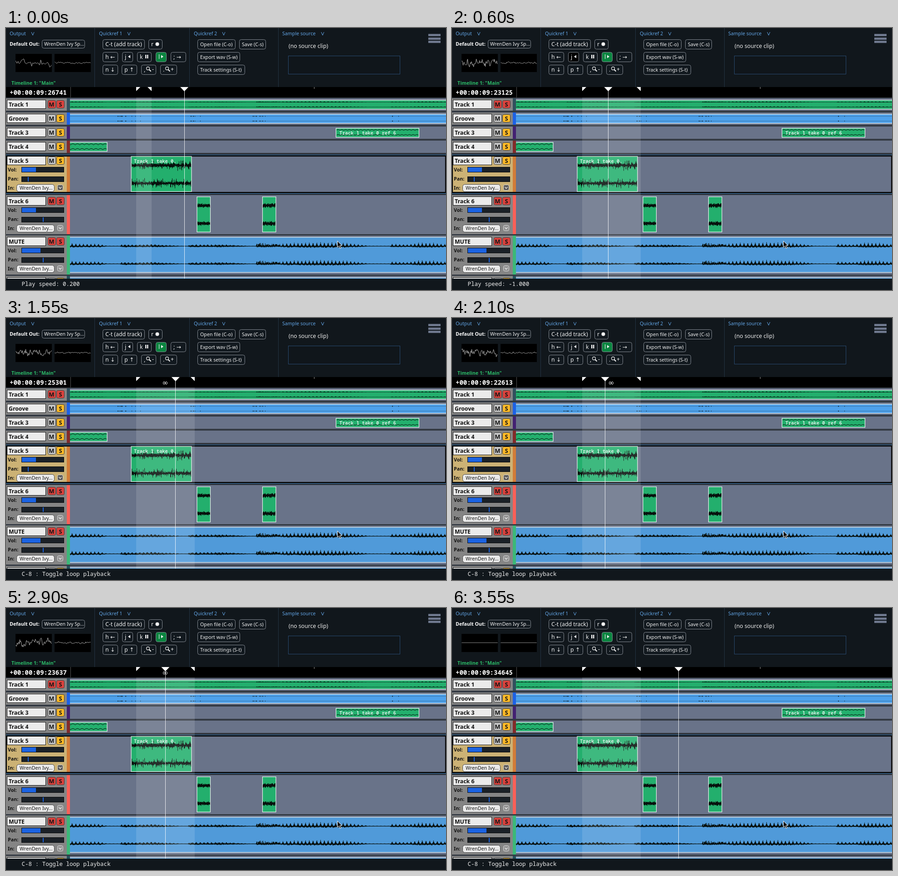
Recreate the animation shown at these times as an HTML page with a canvas. Size 970 px wide and 577 px high, loop 3.6 s.

```html
<!DOCTYPE html>
<html lang="en">
<head>
<meta charset="utf-8">
<title>Timeline playback</title>
<style>
html, body { margin: 0; width: 100%; height: 100%; overflow: hidden; background: #11171c; }
canvas { display: block; }
</style>
</head>
<body>
<canvas id="stage" width="970" height="577"></canvas>
<script>
const W = 970, H = 577, LOOP = 3600, STEP = 50;
const SANS = '"Noto Sans", "Open Sans", "DejaVu Sans", sans-serif';
const MONO = '"Noto Sans Mono", "DejaVu Sans Mono", monospace';
const GREEN = '#23af6d', PANEL = '#11171c', LANE = '#697389';
const screen = document.getElementById('stage').getContext('2d');
const backdrop = document.createElement('canvas');
backdrop.width = W;
backdrop.height = H;
let g = backdrop.getContext('2d');

const rnd = n => { const v = Math.sin(n * 12.9898) * 43758.5453; return v - Math.floor(v); };

function lerpKeys(keys, x) {
  const i = keys.findIndex(k => k[0] > x);
  if (i < 0) return keys[keys.length - 1][1];
  if (i === 0) return keys[0][1];
  const [a, va] = keys[i - 1], [b, vb] = keys[i];
  return va + (vb - va) * (x - a) / (b - a);
}

// ---- drawing helpers ----
function rect(x, y, w, h, color) {
  g.fillStyle = color;
  g.fillRect(x, y, w, h);
}

function frame(x, y, w, h, color) {
  g.strokeStyle = color;
  g.lineWidth = 1;
  g.strokeRect(x + .5, y + .5, w - 1, h - 1);
}

function text(str, x, y, size, color, { weight = 400, family = SANS, align = 'left' } = {}) {
  g.font = `${weight} ${size}px ${family}`;
  g.textAlign = align;
  g.fillStyle = color;
  g.fillText(str, x, y);
}

function poly(points, fill) {
  g.beginPath();
  points.forEach(([x, y]) => g.lineTo(x, y));
  g.closePath();
  g.fillStyle = fill;
  g.fill();
}

function polyline(points, color, width = 1) {
  g.beginPath();
  points.forEach(([x, y]) => g.lineTo(x, y));
  g.strokeStyle = color;
  g.lineWidth = width;
  g.stroke();
}

function pill(x, y, w, h, fill, stroke, radius = 4) {
  g.beginPath();
  g.roundRect(x + .5, y + .5, w - 1, h - 1, radius);
  g.fillStyle = fill;
  g.fill();
  g.strokeStyle = stroke;
  g.lineWidth = 1;
  g.stroke();
}

function button(label, x, y, w, size = 10.7, fill = '#12191f') {
  pill(x, y, w, 22, fill, '#848a92');
  text(label, x + 6, y + 15, size, '#f2f2f2');
}

function magnifier(x, y) {
  g.beginPath();
  g.arc(x, y, 3.4, 0, 7);
  g.strokeStyle = '#f2f2f2';
  g.lineWidth = 1.2;
  g.stroke();
  polyline([[x + 2.5, y + 2.5], [x + 6.5, y + 6.5]], '#f2f2f2', 2.2);
}

// ---- waveforms ----
function wave(x0, x1, centers, up, down) {
  g.fillStyle = '#07100d';
  centers.forEach((cy, ch) => {
    for (let x = x0; x < x1; x++) {
      const u = up(x, ch), d = down(x, ch);
      g.fillRect(x, cy - u, 1, u + d);
    }
  });
}

// A one pixel line that ripples upwards from its centre.
function ripple(x0, x1, centers, height, rate) {
  const up = x => height * Math.abs(Math.sin(x * rate));
  wave(x0, x1, centers, x => up(x) + .6, x => .4 - up(x));
}

const loudness = [[141, 7], [165, 5], [205, 5], [222, .5], [250, .3], [257, 6], [285, 4.5],
  [325, 5], [350, 3.5], [385, .4], [400, .3], [406, 5], [440, 4], [470, 5], [500, 3.5], [535, .4],
  [550, .4], [553, 7], [600, 4], [620, 7], [700, 8.5], [755, 7], [800, .5], [845, .3],
  [850, 5], [885, 3.5], [910, 8], [945, 7], [970, 4]];
const tooth = x => {
  const peak = Math.pow(1 - Math.abs(2 * (x % 8.3) / 8.3 - 1), 2.4);
  if (x > 553 && x < 605) return rnd(x);
  return x > 250 && x < 550 ? .5 * peak + .5 * rnd(x) * rnd(x + 9) : peak;
};
const swell = x => lerpKeys(loudness, x) * tooth(x);
const dip = x => lerpKeys(loudness, x) * (.12 + .32 * rnd(x + .5) * (1 - tooth(x)));

// c is the vertical centre of the lane's name box.
function clip(x, c, w, h, color) {
  const y = c - 9.2;
  rect(x, y, w, h, color);
  g.strokeStyle = '#f0f4f2';
  g.lineWidth = 1.2;
  g.strokeRect(x, y, w, h);
}

function clipName(name, x, y) {
  text(name, x, y, 10.4, 'rgba(235,245,240,.85)', { weight: 600, family: MONO });
}

// ---- static panels ----
function drawTopPanel() {
  rect(0, 0, W, 130, PANEL);
  [196, 405, 601].forEach(x => rect(x - 1, 0, 1, 130, '#233443'));
  [['Output', 8, 59], ['Quickref 1', 205, 271], ['Quickref 2', 414, 480], ['Sample source', 609, 698]]
    .forEach(([label, x, arrow]) => {
      text(label, x, 16, 10.7, '#62a5e6');
      polyline([[arrow - 3, 9], [arrow, 16], [arrow + 3, 9]], '#62a5e6');
    });
  text('Default Out:', 8, 39, 10.7, '#fff', { weight: 700 });
  pill(79, 26, 95, 19, '#12191f', '#848a92');
  text('WrenDen Ivy Sp...', 84, 39, 10.7, '#f2f2f2');
  text('Timeline 1: "Main"', 12, 125, 10.7, '#2cbb68', { weight: 700 });

  button('C-t (add track)', 213, 25, 93, 12.3);
  button('r', 314, 25, 31, 12.3);
  g.beginPath();
  g.arc(333.5, 35.5, 4, 0, 7);
  g.fill();
  button('h ←', 213, 53, 34, 12.3);
  button('; →', 363, 53, 34, 12.3);
  button('n ↓', 213, 81, 34, 12.3);
  button('p ↑', 255, 81, 34, 12.3);
  button(',', 298, 81, 33, 12.3);
  button('.', 340, 81, 37, 12.3);
  magnifier(313, 89);
  magnifier(355, 89);
  text('-', 322, 95, 12.3, '#f2f2f2');
  text('+', 363, 95, 12.3, '#f2f2f2');

  button('Open file (C-o)', 422, 25, 84);
  button('Save (C-s)', 514, 25, 59);
  button('Export wav (S-w)', 422, 53, 94);
  button('Track settings (S-t)', 422, 81, 105);

  text('(no source clip)', 623, 44, 12.3, '#ececec');
  rect(622, 61, 247, 41, '#10161b');
  frame(622, 61, 247, 41, '#28496f');
  [13, 21, 28].forEach(y => rect(931, y, 27, 5, '#6d778c'));
}

function drawLane(name, c, small, strip, { muted, bg = '#858585', vol, pan }) {
  const y = c - 13, h = small ? 27 : 86;
  rect(0, y, 134, h, bg);
  rect(134, y, 7, h, strip);
  rect(141, y, W - 141, h, LANE);
  rect(2, c - 10, 86, 20, '#151515');
  rect(3, c - 9, 84, 18, '#ebebeb');
  text(name, 6, c + 4.5, 12.3, '#101010', { weight: 700 });
  pill(92, c - 9, 18, 18, muted ? '#da423d' : '#c5c5c5', '#3c3c3c', 3);
  pill(111, c - 9, 18, 18, muted ? '#da423d' : '#fdb927', '#3c3c3c', 3);
  text('M', 100.5, c + 5, 13, '#151515', { weight: 600, align: 'center' });
  text('S', 120, c + 5, 13, '#151515', { weight: 600, align: 'center' });
  if (small) return;

  text('Vol:', 4, c + 24, 10.7, '#101010', { weight: 700 });
  text('Pan:', 4, c + 44, 10.7, '#101010', { weight: 700 });
  text('In:', 4, c + 64, 10.7, '#101010', { weight: 700 });
  [14, 35].forEach(dy => {
    rect(34, c + dy, 94, 12, '#1b2127');
    frame(34, c + dy, 94, 12, '#08090a');
  });
  rect(35, c + 15, vol - 35, 10, '#1b63e2');
  rect(pan - 1, c + 36, 2, 10, '#1b63e2');
  pill(23, c + 52, 84, 17, '#ebebeb', '#444', 5);
  text('WrenDen Ivy...', 30, c + 64, 10.7, '#151515');
  pill(113, c + 53, 13, 13, bg === '#858585' ? '#929292' : '#5c5a58', '#ddd', 3);
  polyline([[116.5, c + 58], [119.5, c + 61.5], [122.5, c + 58]], '#f2f2f2', 1.2);
}

function drawTracks() {
  rect(0, 152, W, 400, '#343a43');
  drawLane('Track 1', 168, true, '#31505e', { muted: true });
  drawLane('Groove', 199, true, '#1d62e6', {});
  drawLane('Track 3', 230, true, '#432172', {});
  drawLane('Track 4', 261, true, '#832a2a', {});
  drawLane('Track 5', 292, false, '#d27c38', { bg: '#ccb275', vol: 66, pan: 49 });
  drawLane('Track 6', 381, false, '#fa6058', { muted: true, vol: 66, pan: 82 });
  drawLane('MUTE', 470, false, '#3cb878', { muted: true, vol: 76, pan: 82 });
  drawLane('', 559, false, '#24505c', { vol: 66, pan: 82 });

  // selected lane outline
  [279, 364].forEach(y => {
    rect(0, y - 1, W, 3, '#14191f');
    rect(0, y, W, 1, '#4b8cc4');
  });
  g.lineWidth = 2;
  g.strokeStyle = '#050505';
  g.strokeRect(1, 282, 968, 80);

  g.save();
  g.beginPath();
  g.rect(141, 152, W - 141, 400);
  g.clip();

  clip(130, 168, 860, 20, GREEN);
  wave(141, W, [163.5, 174], x => .3 + swell(x) * .18, x => .2 + dip(x) * .15);
  clip(130, 199, 860, 20, '#4da1ec');
  const beat = x => [[245, 300], [402, 432], [541, 578], [850, 868]].some(([a, b]) =>
    x >= a && x < b && rnd(x) > .6 + .35 * (x - a) / (b - a)) ? .8 : .15;
  wave(141, W, [194.5, 205], beat, beat);

  clip(727.5, 230, 183, 20, GREEN);
  ripple(729, 909, [225.5, 236.5], 1.6, .38);
  clipName('Track 1 take 0 ref 6', 735, 235);

  clip(120, 261, 103, 20, GREEN);
  ripple(141, 222, [257.5, 268], 2.4, .31);

  clip(276, 292, 133, 77.5, GREEN);
  const rough = k => (x, ch) => 1 + 3.2 * rnd(x + ch * 531 + k) + 8 * Math.pow(rnd(x * 3 + ch * 77 + k), 6);
  wave(277, 408, [302.5, 342], rough(0), rough(9));
  clipName('Track 1 take 0.', 282, 297);

  [421, 565.5].forEach(left => {
    const x0 = Math.floor(left);
    clip(left, 381, 29.5, 77.5, GREEN);
    const burst = k => (x, ch) => 1.8 + 3.4 * rnd(x * 2 + ch + k);
    wave(x0 + 1, x0 + 29, [391, 430.5], burst(1), burst(4));
  });

  clip(130, 470, 860, 77.5, '#509ad9');
  wave(141, W, [480.5, 519.5], x => .6 + swell(x), x => .5 + dip(x));
  clip(130, 559, 860, 77.5, '#509ad9');
  g.restore();
}

function drawRuler() {
  rect(0, 130, W, 23, '#000');
  rect(142, 130, 1, 23, '#555');
  rect(679, 130, 1, 4, '#999');
}

drawTopPanel();
drawTracks();
drawRuler();
rect(0, 552, W, 25, PANEL);

// ---- playback ----
const LOOP_SAMPLES = 9588, LOOP_START = 18851;
const REVERSE = 437, PAUSE = 850, RESUME = 1042, LOOP_ON = 1250, LOOP_OFF = 3300;
// [ms, samples], without loop wrapping
const travel = [[0, 26741], [REVERSE, 30936], [600, 23125], [PAUSE, 11125], [RESUME, 11125],
  [1100, 13909], [1550, 34889], [2100, 60965], [2900, 100341], [3550, 130525], [3600, 132925]];

function position(t) {
  const s = lerpKeys(travel, t);
  if (t < LOOP_ON) return s;
  const laps = Math.floor((s - LOOP_START) / LOOP_SAMPLES);
  return s - LOOP_SAMPLES * Math.max(0, Math.min(10, laps));
}

const speedAt = t => t < REVERSE ? .2 : t < RESUME ? -1 : 1;

function noise(u) {
  const i = Math.floor(u), f = u - i;
  return (rnd(i) * (1 - f) + rnd(i + 1) * f) * 2 - 1;
}

function scope(left, gain, s, x, t) {
  rect(left, 57, 80, 40, '#000');
  const paused = t >= PAUSE && t < RESUME;
  const points = [];
  for (let i = 0; i <= 79; i++) {
    const u = s * .17 + i * speedAt(t) * (t < REVERSE ? 2 : .85);
    let v = 0;
    if (!paused && x < 223)
      v = 4 * Math.sin(i * .24 + s * .01) + 2 * Math.sin(i * .11 + s) + noise(u);
    else if (!paused && x > 276 && x < 409)
      v = gain * (noise(u) * 7 + noise(u * .35 + 50) * 5);
    points.push([left + i + .5, 76.5 - v]);
  }
  polyline(points, '#c4c4c4', .9);
}

function drawKeys(t) {
  const pressed = at => t >= at && t < at + 260 ? '#000' : '#12191f';
  const playing = t < PAUSE || t >= RESUME;
  button('j', 256, 53, 24, 12.3, pressed(REVERSE));
  poly([[269, 63], [274, 59.5], [274, 66.5]], '#f2f2f2');
  button('k', 289, 53, 32, 12.3, pressed(PAUSE));
  rect(307, 59, 2.5, 8, '#f2f2f2');
  rect(311, 59, 2.5, 8, '#f2f2f2');
  button('l', 330, 53, 24, 12.3, playing ? '#0b8540' : '#12191f');
  poly([[347, 63], [342, 59.5], [342, 66.5]], '#f2f2f2');
}

function drawPointer(x, y) {
  const shape = [[0, 0], [0, 14], [3.3, 11], [5.8, 16.5], [8.3, 15.4], [5.8, 10.2], [10, 10]]
    .map(([dx, dy]) => [x + dx, y + dy]);
  poly(shape, '#111');
  polyline([...shape, shape[0]], '#fff');
}

function draw(t) {
  g = screen;
  g.drawImage(backdrop, 0, 0);
  const s = position(t), x = 220.5 + (s - 13909) * .013455;
  const out = t < 200 ? 321 : 416;

  scope(21, 1, s, x, t);
  scope(107, .22, s + 311, x, t);
  drawKeys(t);
  text('+00:00:09:' + String(Math.round(s)).padStart(5, '0'), 8, 147, 14, '#fff',
    { weight: 700, family: MONO });

  rect(287, 153, out - 287, 399, 'rgba(255,255,255,.12)');
  poly([[287, 130], [296, 130], [287, 139]], '#fff');
  poly([[out - 9, 130], [out, 130], [out, 139]], '#fff');
  if (t >= LOOP_ON && t < LOOP_OFF)
    text('∞', 351, 148, 16, '#fff', { family: '"DejaVu Sans", sans-serif', align: 'center' });

  poly([[x - 9, 130], [x + 9, 130], [x, 139.5]], '#fff');
  rect(Math.floor(x), 138, 1, 414, 'rgba(255,255,255,.85)');
  drawPointer(730.5, 469);

  const message = t < LOOP_ON ? `Play speed: ${speedAt(t).toFixed(3)}` : 'C-8 : Toggle loop playback';
  text(message, 34.5, 568, 12.57, '#f0f0f0', { weight: 500, family: MONO });
}

function tick(now) {
  draw(Math.floor((now % LOOP) / STEP) * STEP);
  requestAnimationFrame(tick);
}
draw(0);
requestAnimationFrame(tick);
</script>
</body>
</html>
```
